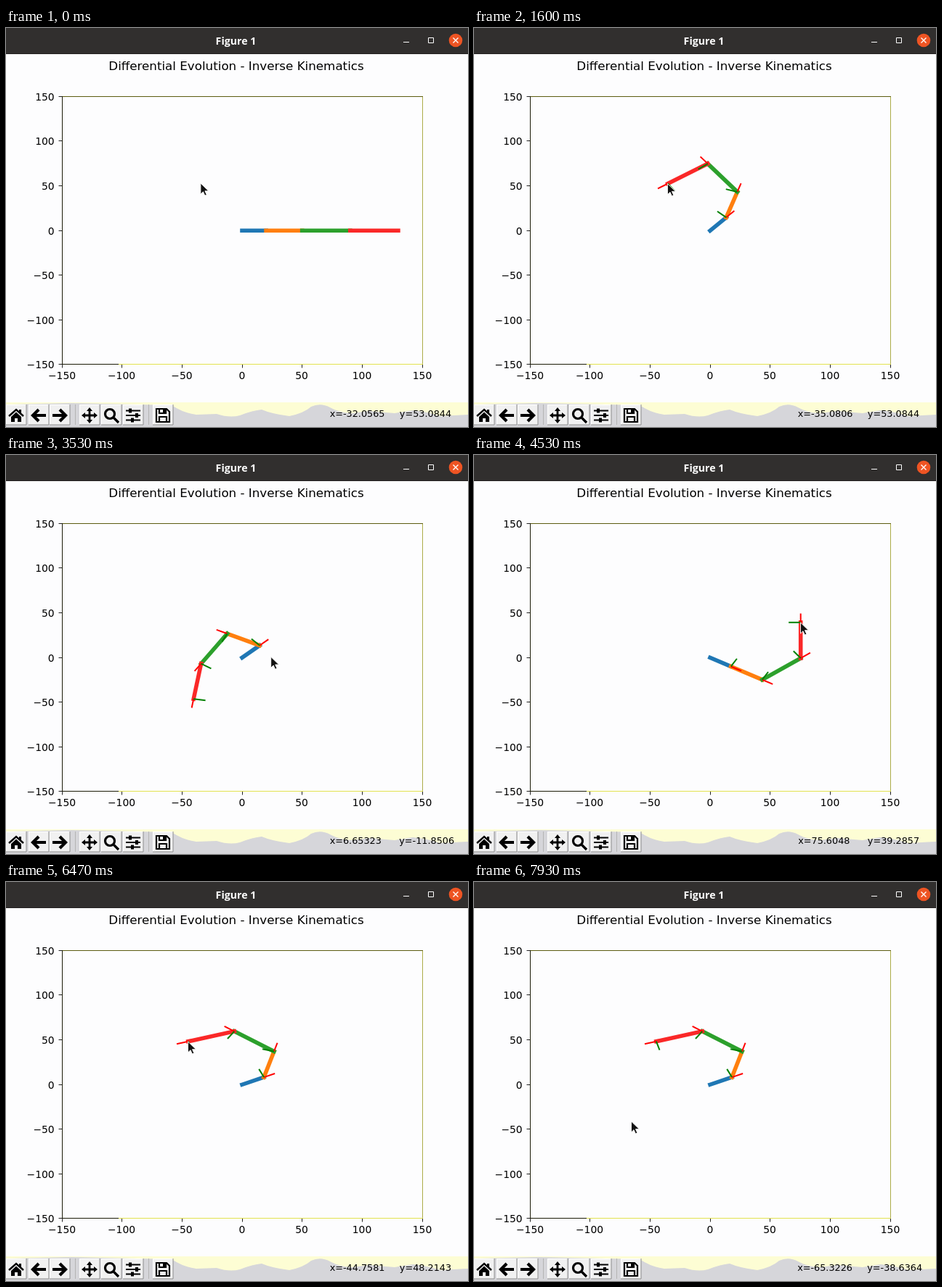
Animation of 636x550 px, one loop 8 s. Source, as an HTML page:

```html
<!DOCTYPE html>
<html lang="en">
<head>
<meta charset="utf-8">
<title>Inverse kinematics plot</title>
<style>
  html, body { margin: 0; width: 636px; height: 550px; overflow: hidden; background: #fdfdfe; }
  svg { position: absolute; left: 0; top: 0; display: block; }
  .plot { font: 13.89px "DejaVu Sans", sans-serif; }
  .heading { font-size: 16.72px; }
  .caption { font: bold 14.2px "Open Sans", sans-serif; fill: #fff; }
  #status {
    position: absolute; right: 2.6px; top: 524px; white-space: pre; color: #000;
    font: 12.8px/16px "DejaVu Sans", sans-serif;
  }
</style>
</head>
<body>
<svg id="stage" width="636" height="550" viewBox="0 0 636 550">
  <rect width="636" height="36" fill="#312f2e"/>
  <rect y="35" width="636" height="1" fill="#232020"/>
  <text class="caption" x="316.5" y="23" text-anchor="middle">Figure 1</text>
  <path d="M547 19.5H555M581.5 13.5h7v7h-7z" fill="none" stroke="#fff"/>
  <circle cx="619" cy="17" r="9.3" fill="#ee5423"/>
  <path d="M615.5 13.5l7 7m0-7l-7 7" stroke="#fff" stroke-width="1.4"/>

  <rect y="516" width="636" height="34" fill="#fdfdd4"/>
  <path fill="#d6d6da" d="M0 519L90 517L228 520Q245 531 262 533L290 532Q308 538 322 534Q340 527 352 526Q366 532 390 535Q410 531 420 522Q433 516 446 523Q458 530 476 531L500 528L535 531L560 527Q580 529 598 535L636 533V550H0Z"/>
  <g id="tools" fill="none" stroke="#000"></g>

  <g id="axes" class="plot">
    <text class="heading" x="317" y="58" text-anchor="middle">Differential Evolution - Inverse Kinematics</text>
    <path d="M573.5 94V464" stroke="#acac48"/>
    <path d="M77 94.5H574" stroke="#5c5c10"/>
    <path d="M155 463.5H574" stroke="#e2e250"/>
    <path d="M77.5 94V464M77 463.5H155" stroke="#1c1c08"/>
  </g>
  <g id="arm"></g>
  <path id="pointer" d="M0 0V15l3.5-3.3 2.4 5.3 2.5-1.1-2.4-5.2h5z" fill="#111" stroke="#fff" stroke-width=".9"/>
</svg>
<div id="status"></div>

<script>
const LOOP = 8000, FRAMES = 120;
const OX = 325, OY = 279;              // plot origin on the stage
const UX = 300 / 496, UY = 300 / 369.6; // data units per pixel
const byId = id => document.getElementById(id);

function add(parent, tag, attrs, text) {
  const el = document.createElementNS("http://www.w3.org/2000/svg", tag);
  for (const key in attrs) el.setAttribute(key, attrs[key]);
  if (text !== undefined) el.textContent = text;
  parent.appendChild(el);
  return el;
}

// Ticks and labels
for (let v = -150; v <= 150; v += 50) {
  const label = String(v).replace("-", "\u2212");
  const x = Math.floor(OX + v / UX) + .5, y = Math.floor(OY - v / UY) + .5;
  add(byId("axes"), "path", { d: `M${x} 464v4.5M72.5 ${y}h4.5`, stroke: "#222" });
  add(byId("axes"), "text", { x: x - .5, y: 484, "text-anchor": "middle" }, label);
  add(byId("axes"), "text", { x: 66.7, y: y + 5, "text-anchor": "end" }, label);
}

// Toolbar: [centre x, stroke width, stroked path, filled path]
const arrow = "M0-8L-8 0L0 8M-8 0H10";
const icons = [
  [14, 2.4, "M-10 1L0-8L10 1", "M-7 2L0-4.5L7 2V9H2V4H-2V9H-7ZM4-8H7V-2L4-5Z"],
  [45, 4.2, arrow, ""],
  [74, 4.2, arrow.replace("-8L-8 0L0", "-8L8 0L0").replace("M-8 0H10", "M8 0H-10"), ""],
  [115, 2.8, "M-8 0H8M0-8V8", "M0-11L4-6H-4ZM0 11L4 6H-4ZM-11 0L-6-4V4ZM11 0L6-4V4Z"],
  [145, 3.2, "M4.5-2A6.5 6.5 0 1 1-8.5-2A6.5 6.5 0 1 1 4.5-2M3 3L10 10", ""],
  [175, 2.2, "M-10-6.5H10M-10 0H10M-10 6.5H10", "M-6-9.5h4v6h-4zM3-3h4v6h-4zM-3 3.5h4v6h-4z"],
  [216, 2.2, "M-9-9H5L9-5V9H-9ZM-5-9V-3H4V-9M-5 9V2H5V9", "M0-8h3v4h-3z"]
];
const tools = byId("tools");
for (const [x, width, line, shape] of icons) {
  const g = add(tools, "g", { transform: `translate(${x} 534)`, "stroke-width": width });
  add(g, "rect", { x: -14, y: -15, width: 28, height: 28, fill: "#f1f1f1", stroke: "none" });
  add(g, "path", { d: "M-13.5 13V-14.5H14", stroke: "#fff", "stroke-width": 1 });
  add(g, "path", { d: "M-14 13H14V-15", stroke: "#8c8c8c", "stroke-width": 1 });
  add(g, "path", { d: line });
  add(g, "path", { d: shape, fill: "#000", stroke: "none" });
}
for (const x of [95.5, 196.5]) add(tools, "path", { d: `M${x} 519V547`, stroke: "#b4b4b4" });

// Arm: four links plus a small frame at the end of each
const lengths = [20, 30, 40, 40];
const colors = ["#1f77b4", "#ff7f0e", "#2ca02c", "#fa2828"];
const poses = [
  [0, [0, 0, 0, 0]],
  [16, [47.7, 72.1, 128, 213.8]],
  [39, [43, 154, 237, 261]],
  [68, [-29.6, -29.6, 37, 90]],
  [97, [24.5, 73.8, 145.7, 196.4]]
];
const arm = byId("arm");
const links = colors.map(stroke =>
  add(arm, "path", { stroke, "stroke-width": 5.6, "stroke-linecap": "square" }));
const marks = colors.map(() => ["#f00", "#008000"].map(stroke =>
  add(arm, "path", { stroke, "stroke-width": 2 })));

function step([x, y], length, degrees) {
  const a = degrees * Math.PI / 180;
  return [x + length * Math.cos(a) / UX, y - length * Math.sin(a) / UY];
}

function drawArm(frame) {
  const [start, angles] = poses.filter(p => p[0] <= frame).pop();
  let at = [OX, OY + .3];
  angles.forEach((angle, i) => {
    const end = step(at, lengths[i], angle);
    links[i].setAttribute("d", `M${at}L${end}`);
    marks[i].forEach((mark, k) =>
      mark.setAttribute("d", start ? `M${end}L${step(end, 10, angle + 90 * k)}` : ""));
    at = end;
  });
}

// Pointer keys: time, pixels right and up of the origin, velocity
const keys = [
  [0, -53, 65, -.08, 0], [300, -58, 65, 0, 0],
  [1640, -58, 65, 0, 0], [2130, -67, -59, 0, 0],
  [3270, -67, -59, 0, 0], [3870, 125, 48, 0, 0],
  [5010, 125, 48, 0, 0], [5400, -42, 51, -.16, .02], [5730, -74, 59, 0, 0],
  [7070, -74, 59, 0, 0], [7930, -108, -48, 0, -.04], [8000, -108, -51, 0, 0]
];

function pointerAt(t) {
  t = Math.min(t, LOOP);
  const i = Math.max(1, keys.findIndex(k => k[0] >= t));
  const a = keys[i - 1], b = keys[i], d = b[0] - a[0], u = (t - a[0]) / d;
  const s = u * u * (3 - 2 * u);
  return [1, 2].map(c => a[c] + (b[c] - a[c]) * s
    + d * u * (1 - u) * (a[c + 2] * (1 - u) - b[c + 2] * u));
}

const field = v => String(+v.toPrecision(6)).padEnd(12);

function draw(now) {
  const frame = Math.floor((now % LOOP) * FRAMES / LOOP + .1) % FRAMES;
  const t = frame * LOOP / FRAMES;
  drawArm(frame);
  const [x, y] = pointerAt(t).map(Math.round);
  byId("status").textContent = `x=${field(x * UX)} y=${field((y + .4) * UY)}`;
  // The readout trails the pointer slightly.
  const [px, py] = pointerAt(t + 60);
  byId("pointer").setAttribute("transform", `translate(${OX - .5 + px} ${OY - py})`);
}

let origin;
function tick(now) {
  origin ??= now;
  draw(now - origin);
  requestAnimationFrame(tick);
}
draw(0);
requestAnimationFrame(tick);
</script>
</body>
</html>
```
